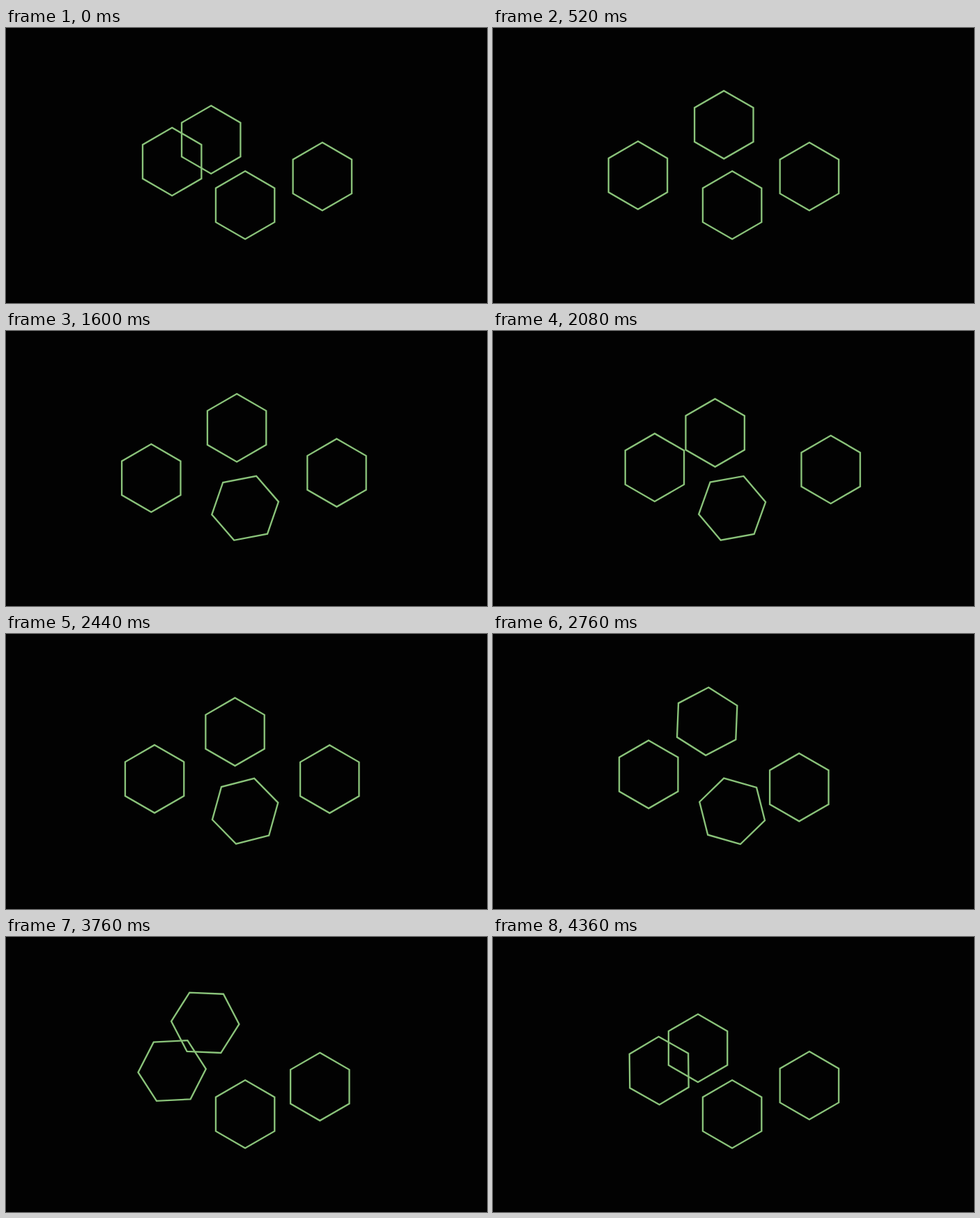
An HTML page that plays this animation: 690x394 px, repeating every 4640 ms.

```html
<!DOCTYPE html>
<html lang="en">
<head>
<meta charset="utf-8">
<title>Hexagons</title>
<style>
  html, body { margin: 0; width: 100%; height: 100%; overflow: hidden; background: #020202; }
  svg { display: block; width: 690px; height: 394px; }
  polygon { fill: none; stroke: #8ac37a; stroke-width: 2.35; }
</style>
</head>
<body>
<svg id="stage" viewBox="0 0 690 394"></svg>
<script>
const LOOP = 4640, LAST = 4360, STEP = 40, RADIUS = 48.7;
const BEAT = 520, RELEASE = 2560, RETURN = 2960;

const clamp = v => Math.min(1, Math.max(0, v));
const progress = (t, start, end) => clamp((t - start) / (end - start));
const ease = (t, start, end) => (1 - Math.cos(Math.PI * progress(t, start, end))) / 2;

// cubic-bezier(.51, 0, .48, 1), solved by bisection
function bezier(s) {
  let lo = 0, hi = 1, u = 0.5;
  for (let i = 0; i < 24; i++) {
    const v = 1 - u;
    if (3 * v * v * u * 0.51 + 3 * v * u * u * 0.48 + u ** 3 < s) lo = u; else hi = u;
    u = (lo + hi) / 2;
  }
  return u * u * (3 - 2 * u);
}
const halfTurn = (t, start, end) => 180 * bezier(progress(t, start, end));

// Point at a distance from another, along an angle in degrees
function along([x, y], angle, distance) {
  const a = angle * Math.PI / 180;
  return [x + distance * Math.cos(a), y + distance * Math.sin(a)];
}

// Leaves home once, then bounces between the touching point and the far end
function bounce(t, touch, far) {
  const time = Math.min(t, RELEASE);
  const near = time < BEAT ? 0 : touch;
  return near + (far - near) * (1 - Math.cos(Math.PI * time / BEAT)) / 2;
}

// Each returns [x, y, rotation]
function left(t) {
  const distance = bounce(t, 7.5, 36) * (1 - ease(t, RELEASE, RETURN));
  return [...along([238.2, 191.5], 147.2, distance), halfTurn(t, 3120, 4430)];
}

function top_(t) {
  const out = along([294.2, 160], -30, bounce(t, 28.2, 42.8));
  const raised = along(out, 209.5, 55 * ease(t, RELEASE, RETURN));
  const fall = ease(t, 3440, 4440);
  const x = raised[0] + (294.2 - raised[0]) * fall;
  const y = raised[1] + (160 - raised[1]) * fall;
  return [x, y, halfTurn(t, 2600, 4260)];
}

function middle(t) {
  return [343.1, 253.8, halfTurn(t, 1040, 3260)];
}

function right(t) {
  const distance = 34.8 * ease(t, 1000, 2000) - 61.2 * ease(t, 2000, 3040) + 26.4 * ease(t, 3040, 4000);
  return [...along([453.8, 212.8], -25, distance), 0];
}

const corners = Array.from({ length: 6 }, (_, i) => along([0, 0], i * 60 - 90, RADIUS)).join(' ');
const stage = document.getElementById('stage');
const hexes = [left, top_, middle, right].map(pose => {
  const node = document.createElementNS('http://www.w3.org/2000/svg', 'polygon');
  node.setAttribute('points', corners);
  stage.append(node);
  return { node, pose };
});

function draw() {
  const now = performance.now() % LOOP;
  const t = Math.min(LAST, Math.floor(now / STEP) * STEP);
  for (const { node, pose } of hexes) {
    const [x, y, angle] = pose(t);
    node.setAttribute('transform', `translate(${x} ${y}) rotate(${angle})`);
  }
  requestAnimationFrame(draw);
}
draw();
</script>
</body>
</html>
```
